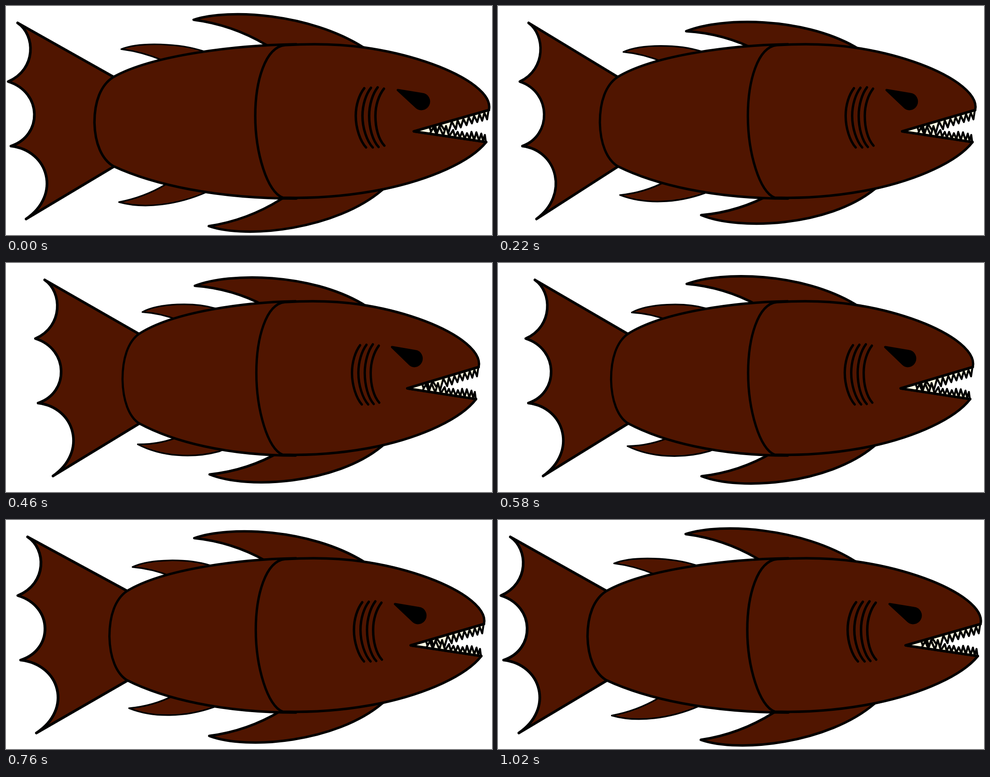
Write an HTML page with a canvas that moves like this. It is 1088 px wide and 515 px high and loops after 1.04 s.

```html
<!DOCTYPE html>
<html lang="en">
<head>
<meta charset="utf-8">
<title>Swimming fish</title>
<style>
html, body { margin: 0; width: 100%; height: 100%; overflow: hidden; background: #fff; }
canvas { display: block; }
</style>
</head>
<body>
<canvas id="stage" width="1088" height="515"></canvas>
<script>
const ctx = document.getElementById('stage').getContext('2d');
const LOOP = 1040, STEP = 20;
const SKIN = '#501500', TOOTH = '#fffbe2', INK = '#000';

const shapes = {
  tail: 'M255 168 L240 159 L26 38 C66 65 69 142 5 170 C82 194 82 292 11 315 C96 325 124 425 45 479 L240 362 L255 353',
  topFin: 'M818 106 L800 93 C680 17 500 5 420 31 Q505 42 580 86 L600 97',
  lowFin: 'M860 398 L843 413 C740 502 540 525 454 495 Q540 482 615 435 L640 420',
  rearTop: 'M465 110 L443 102 C390 84 300 80 258 97 Q305 103 350 122 L362 128',
  rearLow: 'M470 406 L450 418 C385 447 310 457 253 441 Q310 430 358 401 L370 393',
  body: 'M650 86 C520 88 330 109 240 160 C212 178 198 215 198 262 C199 310 215 345 240 360 C330 402 470 433 650 433',
  head: 'M625 88 C690 84 750 86 800 93 C900 107 990 138 1041 173 C1068 192 1086 213 1081 234 L913 282 L1075 306 ' +
    'C1040 350 950 390 845 412 C770 427 690 433 620 431 C585 420 558 330 558 247 C558 170 580 92 625 88 Z',
  eye: 'M877 189 L932 198 A17 17 0 1 1 918 227 Z',
  gape: 'M913 282 L1000 257 L988 292 Z',
  upperTeeth: 'M948 272 L953 286 L961 270 L966 287 L973 266 L989 290 L998 260 L1007 277 L1011 257 L1018 273 ' +
    'L1024 254 L1031 268 L1036 250 L1043 264 L1048 247 L1055 261 L1060 243 L1066 258 L1071 240 L1077 255 L1080 236',
  lowerTeeth: 'M949 287 L957 273 L964 289 L970 271 L979 291 L985 270 L992 293 L1001 279 L1005 294 L1011 283 ' +
    'L1016 296 L1021 283 L1027 298 L1032 286 L1038 299 L1042 283 L1048 301 L1053 284 L1059 302 L1064 287 L1068 303 L1072 290 L1074 305'
};
for (const name in shapes) shapes[name] = new Path2D(shapes[name]);

// Top x, top y, end x and end y of each gill slit
const gills = [[802, 185, 806, 318], [817, 184, 821, 318], [832, 183, 834, 317], [846, 186, 847, 314]];

const tailKeys = [[0, 1], [115, 0.905], [470, 0.985], [560, 0.96], [740, 1.04], [LOOP, 1]];

// Linear rise to 1 at the peak, linear fall to 0 at the loop end
const swing = (t, peak) => t < peak ? t / peak : (LOOP - t) / (LOOP - peak);

function keyed(keys, t) {
  const i = keys.findIndex(k => t < k[0]);
  const [t0, v0] = keys[i - 1], [t1, v1] = keys[i];
  return v0 + (v1 - v0) * (t - t0) / (t1 - t0);
}

// Horizontal scale about px plus vertical skew about qx
function pose(scale, px, skew = 0, qx = 0) {
  ctx.setTransform(scale, -skew, 0, 1, px * (1 - scale), skew * qx);
}

function paint(path, width, fill = SKIN) {
  ctx.fillStyle = fill;
  ctx.fill(path);
  ctx.lineWidth = width;
  ctx.stroke(path);
}

function drawHead() {
  paint(shapes.head, 5.5);
  paint(shapes.eye, 5, INK);

  ctx.lineWidth = 5.5;
  for (const [x0, y0, x1, y1] of gills) {
    const mid = x0 - 19;
    ctx.beginPath();
    ctx.moveTo(x0, y0);
    ctx.bezierCurveTo(x0 - 11, y0 + 14, mid, 222, mid, 247);
    ctx.bezierCurveTo(mid, 275, x1 - 13, y1 - 14, x1, y1);
    ctx.stroke();
  }

  ctx.fillStyle = TOOTH;
  ctx.fill(shapes.gape);
  paint(shapes.upperTeeth, 4.5, TOOTH);
  paint(shapes.lowerTeeth, 4.5, TOOTH);
  ctx.lineWidth = 5.5;
  ctx.beginPath();
  ctx.moveTo(1081, 234);
  ctx.lineTo(913, 282);
  ctx.lineTo(1075, 306);
  ctx.stroke();
}

function draw(t) {
  const squash = swing(t, 486), flap = swing(t, 240);
  const bodyScale = 1 - 0.1502 * squash;
  const tailScale = keyed(tailKeys, t);
  const joint = 640 - 400 * bodyScale;

  ctx.setTransform(1, 0, 0, 1, 0, 0);
  ctx.fillStyle = '#fff';
  ctx.fillRect(0, 0, 1088, 515);
  ctx.strokeStyle = INK;
  ctx.lineJoin = ctx.lineCap = 'round';

  ctx.setTransform(tailScale, 0, 0, 1, joint - 240 * tailScale, 0);
  paint(shapes.tail, 6);

  pose(1 - 0.126 * squash, 653, 0.0838 * swing(t, 540), 443);
  paint(shapes.rearTop, 3.5);
  pose(1 - 0.081 * squash, 800, -0.2085 * squash, 421);
  paint(shapes.rearLow, 3.5);

  pose(1 - 0.013 * squash, 650, 0.0778 * flap, 780);
  paint(shapes.topFin, 5.5);
  pose(1 - 0.012 * squash, 620, -0.069 * flap, 845);
  paint(shapes.lowFin, 5.5);

  pose(bodyScale, 640);
  paint(shapes.body, 5.5);

  pose(1 - 0.0517 * swing(t, 420), 609);
  drawHead();
}

function tick(now) {
  draw(Math.floor(now % LOOP / STEP) * STEP);
  requestAnimationFrame(tick);
}
draw(0);
requestAnimationFrame(tick);
</script>
</body>
</html>
```
